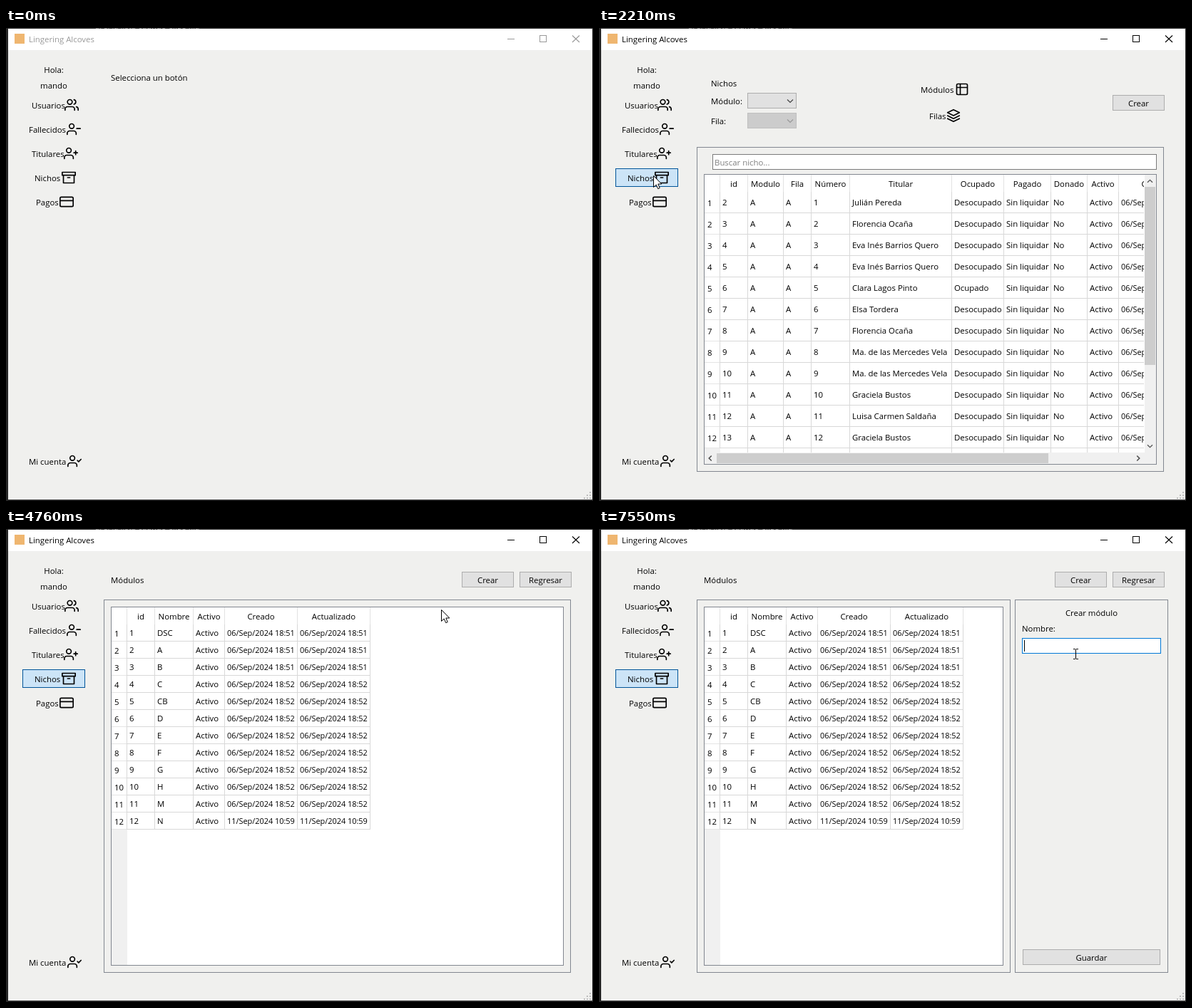
Animation of 823x664 px, one loop 8 s. Source, as an HTML page with a canvas:

```html
<!DOCTYPE html>
<html lang="es">
<head>
<meta charset="utf-8">
<title>Lingering Alcoves</title>
<style>
html, body { margin: 0; width: 823px; height: 664px; overflow: hidden; background: #f0f0ee; }
canvas { display: block; }
</style>
</head>
<body>
<canvas id="stage" width="823" height="664"></canvas>
<script>
const ctx = document.getElementById('stage').getContext('2d');
const LOOP = 8000, STEP = 70;
const BG = '#f0f0ee', FRAME = '#828790', GRID = '#d8d8d8';
const BODY = 11.4, DATE = 10.9;

// ---- helpers ----
function text(s, x, y, { align = 'left', color = '#000', size = BODY } = {}) {
  ctx.font = size + 'px "Open Sans", "Noto Sans", sans-serif';
  ctx.textAlign = align;
  ctx.fillStyle = color;
  ctx.fillText(s, x, y);
}
const mid = (s, x, y) => text(s, x, y, { align: 'center' });

function fill(x0, y0, x1, y1, color) {
  ctx.fillStyle = color;
  ctx.fillRect(x0, y0, x1 - x0, y1 - y0);
}
function box(x0, y0, x1, y1, inside, border) {
  fill(x0, y0, x1, y1, border);
  fill(x0 + 1, y0 + 1, x1 - 1, y1 - 1, inside);
}
function line(color, width, ...pts) {
  ctx.strokeStyle = color;
  ctx.lineWidth = width;
  ctx.beginPath();
  for (let i = 0; i < pts.length; i += 2) ctx.lineTo(pts[i], pts[i + 1]);
  ctx.stroke();
}
function chevron(x, y, dx, dy, color, r = 4) {
  const h = r / 2;
  if (dy) line(color, 1.2, x - r, y - dy * h, x, y + dy * h, x + r, y - dy * h);
  else line(color, 1.6, x - dx * h, y - r, x + dx * h, y, x - dx * h, y + r);
}
function button(label, x0, y0, x1, y1, state) {
  const look = { hover: ['#e5f1fb', '#0078d7'], down: ['#cce4f7', '#005499'] }[state] || ['#e1e1e1', '#adadad'];
  box(x0, y0, x1, y1, ...look);
  mid(label, (x0 + x1) / 2, y0 + 16);
}

// ---- icons on a 24-unit grid ----
const person = 'M16 21v-2a4 4 0 0 0-4-4H5a4 4 0 0 0-4 4v2M12.5 7a4 4 0 1 1-8 0a4 4 0 1 1 8 0';
const icons = {
  users: 'M17 21v-2a4 4 0 0 0-4-4H5a4 4 0 0 0-4 4v2M13 7a4 4 0 1 1-8 0a4 4 0 1 1 8 0M23 21v-2a4 4 0 0 0-3-3.87M16 3.13a4 4 0 0 1 0 7.75',
  minus: person + 'M23 11H17',
  plus: person + 'M20 8v6M23 11H17',
  check: person + 'M17 11l2 2 4-4',
  archive: 'M21 8v13H3V8M1 3h22v5H1zM10 12h4',
  card: 'M3 4h18a2 2 0 0 1 2 2v12a2 2 0 0 1-2 2H3a2 2 0 0 1-2-2V6a2 2 0 0 1 2-2zM1 10h22',
  table: 'M5 3h14a2 2 0 0 1 2 2v14a2 2 0 0 1-2 2H5a2 2 0 0 1-2-2V5a2 2 0 0 1 2-2zM9 3v18M3 9h18',
  layers: 'M12 2L2 7l10 5 10-5zM2 17l10 5 10-5M2 12l10 5 10-5'
};
for (const k in icons) icons[k] = new Path2D(icons[k]);

function icon(name, x, y) {
  ctx.save();
  ctx.translate(x, y);
  ctx.scale(20 / 24, 20 / 24);
  ctx.lineWidth = 2;
  ctx.lineCap = ctx.lineJoin = 'round';
  ctx.strokeStyle = '#000';
  ctx.stroke(icons[name]);
  ctx.restore();
}
function link(label, name, x, iconX, cy) {
  text(label, x, cy + 5);
  icon(name, iconX, cy - 10);
}

// ---- data ----
const owners = [
  'Julián Pereda', 'Florencia Ocaña', 'Eva Inés Barrios Quero', 'Eva Inés Barrios Quero',
  'Clara Lagos Pinto', 'Elsa Tordera', 'Florencia Ocaña', 'Ma. de las Mercedes Vela',
  'Ma. de las Mercedes Vela', 'Graciela Bustos', 'Luisa Carmen Saldaña', 'Graciela Bustos'
];
const nicheRows = owners.map((name, i) => [
  i + 2, 'A', 'A', i + 1, name, i === 4 ? 'Ocupado' : 'Desocupado',
  'Sin liquidar', 'No', 'Activo', '06/Sep/2024'
]);
const moduleRows = ['DSC', ...'A B C CB D E F G H M N'.split(' ')].map((name, i) => {
  const date = i === 11 ? '11/Sep/2024 10:59' : '06/Sep/2024 18:5' + (i < 3 ? 1 : 2);
  return [i + 1, name, 'Activo', date, date];
});
const niches = {
  cols: [169, 208, 258, 297, 351, 494, 567, 633, 684, 728, 830],
  heads: ['id', 'Modulo', 'Fila', 'Número', 'Titular', 'Ocupado', 'Pagado', 'Donado', 'Activo', 'Creado'],
  rows: nicheRows, top: 206, rowH: 30
};
const modules = {
  cols: [169, 208, 262, 306, 408, 510],
  heads: ['id', 'Nombre', 'Activo', 'Creado', 'Actualizado'],
  rows: moduleRows, top: 110, rowH: 24
};

function grid({ cols, heads, rows, top, rowH }, right, bottom, clipX, clipY) {
  box(147, top - 1, right, bottom, '#fff', FRAME);
  ctx.save();
  ctx.beginPath();
  ctx.rect(148, top, clipX - 148, clipY - top);
  ctx.clip();
  const first = top + 24, end = first + rows.length * rowH;
  const last = cols[cols.length - 1];
  for (const x of cols) {
    fill(x, top, x + 1, first, '#e2e2e2');
    fill(x, first, x + 1, Math.min(clipY, end + (rowH > 24 ? 20 : 0)), GRID);
  }
  heads.forEach((h, c) => mid(h, (cols[c] + cols[c + 1]) / 2 + 0.5, top + 17));
  rows.forEach((row, r) => {
    const y = first + r * rowH, base = y + rowH / 2 + (rowH > 24 ? 4 : 4);
    fill(148, y + rowH - 1, 169, y + rowH, '#e5e5e5');
    fill(169, y + rowH - 1, last + 1, y + rowH, GRID);
    text(r + 1, 152, base + 1);
    row.forEach((v, c) => text(v, cols[c] + 4, base, { size: /\d\//.test(v) ? DATE : BODY }));
  });
  if (end < clipY) fill(148, end, 170, clipY, '#f0f0f0');
  ctx.restore();
}

// ---- window parts ----
function chrome(active) {
  fill(0, 0, 823, 664, '#262626');
  text('al si la lista cuando elige fija', 125, 1, { color: '#999' });
  fill(3, 1, 822, 31, '#fff');
  fill(3, 31, 822, 662, BG);
  fill(12, 8, 26, 22, '#efb670');
  const ink = active ? '#000' : '#999';
  text('Lingering Alcoves', 32, 20, { color: ink });
  line(ink, 1, 703, 15.5, 713, 15.5);
  ctx.strokeRect(748.5, 10.5, 9, 9);
  line(ink, 1.1, 794, 10.5, 804, 20);
  line(ink, 1.1, 804, 10.5, 794, 20);
  for (let r = 0; r < 3; r++)
    for (let c = 2 - r; c < 3; c++) fill(810 + c * 4, 651 + r * 4, 812 + c * 4, 653 + r * 4, '#bdbdbd');
}
function sidebar(picked) {
  mid('Hola:', 67, 63);
  mid('mando', 67, 85);
  if (picked) box(23, 197, 111, 223, '#cce4f7', '#005499');
  link('Usuarios', 'users', 36, 82, 108);
  link('Fallecidos', 'minus', 32, 85, 142);
  link('Titulares', 'plus', 36, 81, 176);
  link('Nichos', 'archive', 40, 78, 210);
  link('Pagos', 'card', 42, 75, 244);
  link('Mi cuenta', 'check', 32, 86, 608);
}
function nicheView(picked) {
  text('Nichos', 157, 82);
  text('Módulo:', 157, 107);
  text('Fila:', 157, 135);
  box(208, 91, 277, 113, '#e1e1e1', '#adadad');
  chevron(268, 102.5, 0, 1, '#444');
  box(208, 119, 277, 141, '#cccccc', '#bfbfbf');
  chevron(268, 130.5, 0, 1, '#999');
  if (picked) box(444, 73, 522, 99, '#cce4f7', '#005499');
  link('Módulos', 'table', 451, 499, 86);
  link('Filas', 'layers', 463, 487, 123);
  button('Crear', 720, 94, 793, 116);

  box(137, 167, 792, 623, BG, FRAME);
  box(159, 177, 782, 199, '#fff', '#7a7a7a');
  text('Buscar nicho...', 162, 193, { color: '#7f7f7f' });
  grid(niches, 782, 613, 764, 596);
  fill(765, 206, 781, 612, '#f0f0f0');
  fill(148, 596, 781, 612, '#f0f0f0');
  fill(765, 223, 780, 473, '#cdcdcd');
  fill(165, 597, 630, 611, '#cdcdcd');
  chevron(772.5, 215, 0, -1, '#505050', 3.5);
  chevron(772.5, 587, 0, 1, '#505050', 3.5);
  chevron(156, 604, -1, 0, '#505050', 3.5);
  chevron(756, 604, 1, 0, '#505050', 3.5);
}
function moduleView(t, createState) {
  const panel = t >= 5800;
  text('Módulos', 147, 76);
  button('Crear', 639, 60, 712, 82, createState);
  button('Regresar', 720, 60, 793, 82);
  const right = panel ? 577 : 792;
  box(137, 99, right, 623, BG, FRAME);
  grid(modules, right - 10, 613, right - 11, 612);
  if (!panel) return;
  box(583, 99, 798, 623, BG, FRAME);
  mid('Crear módulo', 690.5, 122);
  text('Nombre:', 593, 144);
  const focus = t >= 6490;
  box(593, 153, 788, 175, '#fff', focus ? '#0078d7' : '#7a7a7a');
  if (focus && (t < 7020 || t >= 7550)) fill(596, 156, 597, 172, '#000');
  button('Guardar', 594, 590, 787, 612);
}

// ---- pointer ----
// start time, number of steps, from, bend, to
const moves = [
  [190, 11, [631, 606], [330, 400], [78, 208]],
  [1080, 1, [78, 208], [77, 208], [76, 207]],
  [2610, 10, [76, 207], [300, 120], [501, 76]],
  [3490, 1, [501, 76], [501, 76], [502, 77]],
  [4550, 10, [502, 77], [540, 160], [702, 77]],
  [5870, 8, [702, 77], [690, 130], [668, 175]]
];
const clicks = [[1080, 1280], [3750, 3890], [5590, 5730], [6490, 6560]];

function pointer(t) {
  const move = moves.filter(m => t >= m[0]).pop();
  if (!move) return null;
  const [start, n, a, b, c] = move;
  const p = Math.min(1, (Math.floor((t - start) / STEP) + 1) / n);
  const u = 1 - Math.pow(1 - p, 2.2), v = 1 - u;
  return [0, 1].map(i => Math.round(v * v * a[i] + 2 * u * v * b[i] + u * u * c[i]));
}
const arrow = new Path2D('M.5 .5V16.5L4.2 13L6.7 18.7L9.2 17.6L6.8 12H11.8Z');

function drawPointer([x, y], t) {
  if (clicks.some(([on, off]) => t >= on && t < off)) {
    ctx.fillStyle = 'rgba(240,240,50,.62)';
    ctx.beginPath();
    ctx.arc(x, y, 11, 0, 7);
    ctx.fill();
  }
  if (t >= 5870 && y > 153) {
    fill(x, y - 6, x + 1, y + 7, '#000');
    for (const e of [-7, 7]) {
      fill(x - 3, y + e, x, y + e + 1, '#000');
      fill(x + 1, y + e, x + 4, y + e + 1, '#000');
    }
    return;
  }
  ctx.save();
  ctx.translate(x, y);
  ctx.fillStyle = '#fff';
  ctx.fill(arrow);
  ctx.strokeStyle = '#000';
  ctx.lineWidth = 1;
  ctx.stroke(arrow);
  ctx.restore();
}

function draw(t) {
  const at = pointer(t);
  chrome(t >= 1080);
  sidebar(t >= 1080);
  if (t < 2210) text('Selecciona un botón', 147, 74);
  else if (t < 3960) nicheView(t >= 3750);
  else {
    const over = at[0] >= 639 && at[0] < 712 && at[1] >= 60 && at[1] < 82;
    moduleView(t, t >= 5590 && t < 5800 ? 'down' : over ? 'hover' : '');
  }
  if (at) drawPointer(at, t);
}

const begin = performance.now();
function tick() {
  draw((performance.now() - begin) % LOOP);
  requestAnimationFrame(tick);
}
tick();
</script>
</body>
</html>
```
